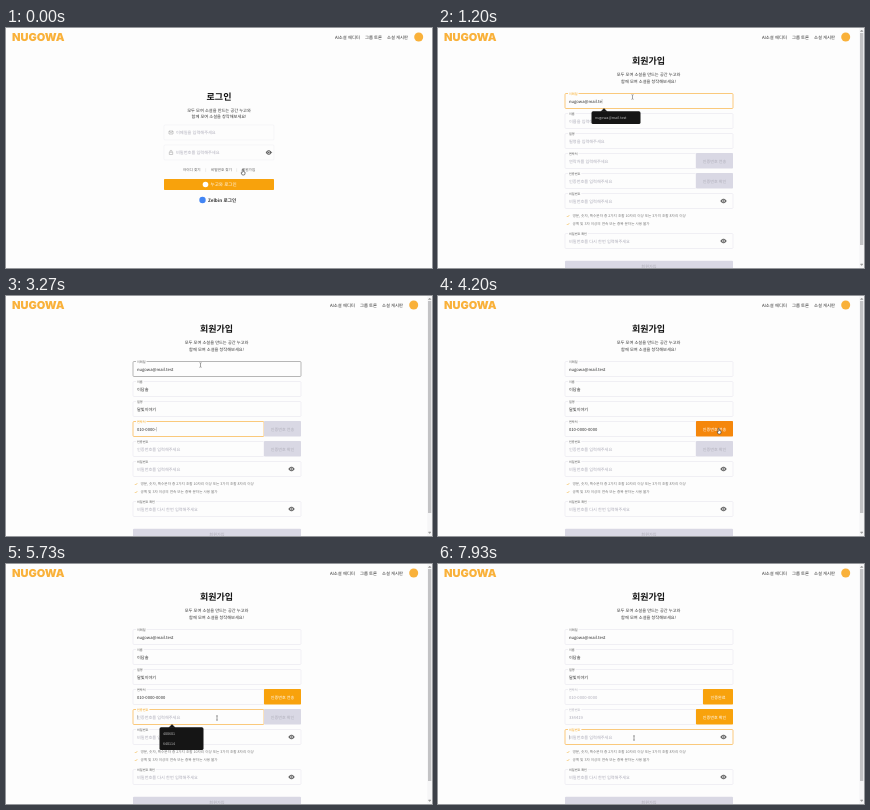
An HTML page with a canvas for the animation above (8000 ms loop, 426 by 240 pixels).

```html
<!DOCTYPE html>
<html lang="ko">
<head>
<meta charset="utf-8">
<style>
html, body { margin: 0; height: 100%; overflow: hidden; background: #fdfdfd; }
canvas { display: block; width: 100vw; height: 100vh; }
</style>
</head>
<body>
<canvas></canvas>
<script>
const W = 426, H = 240, LOOP = 8000;
const canvas = document.querySelector('canvas');
const ctx = canvas.getContext('2d');
const FONT = '"Noto Sans CJK KR", "Noto Sans CJK", "Noto Sans", sans-serif';
const ORANGE = '#f8a20c', HOVER = '#f5870c', INK = '#2b2b2b', PALE = '#ebeaf1', HINT = '#aeadba', MUTED = '#d9d8e4';
const BRAND = 'NUGOWA', BRAND_KO = '누고와', EMAIL = 'nugowa@mail.test';

function text(str, x, y, size = 4.17, color = INK, weight = 400, align = 'left', family = FONT) {
  ctx.font = `${weight} ${size}px ${family}`;
  ctx.fillStyle = color;
  ctx.textAlign = align;
  ctx.fillText(str, x, y + size * 0.37);
}

function rect(x, y, w, h, color, r = 0) {
  ctx.fillStyle = color;
  ctx.beginPath();
  ctx.roundRect(x, y, w, h, r);
  ctx.fill();
}

function outline(x, y, w, h, color, line = 0.7) {
  ctx.strokeStyle = color;
  ctx.lineWidth = line;
  ctx.beginPath();
  ctx.roundRect(x, y, w, h, 1);
  ctx.stroke();
}

function dot(x, y, r, color) {
  ctx.fillStyle = color;
  ctx.beginPath();
  ctx.arc(x, y, r, 0, 7);
  ctx.fill();
}

function path(d, x, y, color, fill) {
  ctx.save();
  ctx.translate(x, y);
  const shape = new Path2D(d);
  if (fill) { ctx.fillStyle = fill; ctx.fill(shape); }
  ctx.strokeStyle = color;
  ctx.lineWidth = 0.6;
  ctx.stroke(shape);
  ctx.restore();
}

function eye(x, y) {
  path('M-2.9 0Q0-3.8 2.9 0Q0 3.8-2.9 0Z', x, y, '#555', '#555');
  dot(x, y, 1.3, '#fff');
  dot(x, y, 0.8, '#555');
}

function header(shift) {
  text(BRAND, 6, 9, 11, '#f9b13a', 900, 'left', 'Inter, sans-serif');
  text('AI소설 에디터', 329 - shift, 9.3, 4.3, INK, 500);
  text('그룹 토론', 359 - shift, 9.3, 4.3, INK, 500);
  text('소설 게시판', 381 - shift, 9.3, 4.3, INK, 500);
  dot(412.7 - shift, 9, 4.5, '#f9b13a');
}

function intro(title, x, y) {
  text(title, x, y, 9, '#111', 700, 'center');
  text(`모두 모여 소설을 만드는 공간 ${BRAND_KO}`, x, y + 13.5, 4.2, '#333', 400, 'center');
  text('함께 모여 소설을 창작해보세요!', x, y + 20.2, 4.2, '#333', 400, 'center');
}

function loginPage() {
  header(0);
  intro('로그인', 213, 68.5);
  outline(158, 97, 110, 15, '#f3f2f5');
  outline(158, 117, 110, 15, '#f3f2f5');
  path('M-2-1.5H2V1.5H-2ZM-2-1.5L0 .3L2-1.5', 165, 104.5, '#aaa');
  path('M-1.7-.3H1.7V2H-1.7ZM-1-.3V-1.2A1 1 0 0 1 1-1.2V-.3', 165, 124.5, '#aaa');
  text('이메일을 입력해주세요', 170, 104.3, 4.2, HINT);
  text('비밀번호를 입력해주세요', 170, 124.3, 4.2, HINT);
  eye(262.8, 124.5);
  text('아이디 찾기', 177, 142, 3.6, '#555');
  text('|', 200, 142, 3.2, '#aaa', 400, 'center');
  text('비밀번호 찾기', 205, 142, 3.6, '#555');
  text('|', 231, 142, 3.2, '#aaa', 400, 'center');
  text('회원가입', 236, 142, 3.6, '#555');
  rect(158, 151, 110, 11, ORANGE, 0.7);
  dot(199.5, 156.5, 2.8, '#fff');
  text(`${BRAND_KO} 로그인`, 204.5, 156.5, 4.5, '#fff', 500);
  dot(196.5, 172, 3.2, '#4285f4');
  text('Zelbin 로그인', 202, 172, 4.6, '#333', 700);
}

// Fields with their typing span and the span during which they hold focus.
const fields = [
  { y: 65.5, label: '이메일', hint: '이메일을 입력해주세요', value: EMAIL, type: [560, 1290], focus: [530, 1400] },
  { y: 85.5, label: '이름', hint: '이름을 입력해주세요', value: '이담솔', type: [1450, 1750], focus: [1400, 1800] },
  { y: 105.5, label: '필명', hint: '필명을 입력해주세요', value: '달빛이야기', type: [1850, 2230], focus: [1800, 2300] },
  { y: 125.5, label: '연락처', hint: '연락처를 입력해주세요', value: '010-0000-0000', type: [2500, 3600], focus: [2300, 4100],
    button: '인증번호 전송' },
  { y: 145.5, label: '인증번호', hint: '인증번호를 입력해주세요', value: '334419', type: [5900, 6650], focus: [5450, 7350],
    button: '인증번호 확인' },
  { y: 165.5, label: '비밀번호', hint: '비밀번호를 입력해주세요', focus: [7800, LOOP], eye: true },
  { y: 205.5, label: '비밀번호 확인', hint: '비밀번호를 다시 한번 입력해주세요', focus: [LOOP, LOOP], eye: true },
];
const SIGNUP = 330, VERIFIED = 7350;

function typed({ value, type }, t) {
  if (!value) return '';
  const p = Math.min(1, Math.max(0, (t - type[0]) / (type[1] - type[0])));
  return value.slice(0, Math.floor(p * value.length));
}

const inside = (p, x, y, w, h) => p.x > x && p.x < x + w && p.y > y && p.y < y + h;

function drawField(f, t, pointer) {
  const value = typed(f, t);
  const focused = t >= f.focus[0] && t < f.focus[1];
  const verified = f.button && t >= VERIFIED;
  const done = verified && f.label === '연락처';
  const split = done ? 265 : 258;
  const width = f.button ? split - 127 : 168;
  const hovered = inside(pointer, 127, f.y, width, 15);
  const border = focused ? '#f9b446' : hovered && !verified ? '#999' : PALE;
  outline(127, f.y, width, 15, border);

  ctx.font = `400 3.1px ${FONT}`;
  rect(130, f.y - 1, ctx.measureText(f.label).width + 2, 2, '#fdfdfd');
  text(f.label, 131, f.y, 3.1, focused ? ORANGE : verified ? HINT : '#555');
  text(value || f.hint, 131, f.y + 7.7, 4.17, value && !verified ? INK : HINT);
  if (focused) {
    ctx.font = `400 4.17px ${FONT}`;
    rect(131 + ctx.measureText(value).width, f.y + 5.4, 0.3, 4.6, '#666');
  }
  if (f.eye) eye(285.5, f.y + 7.5);
  if (f.button) {
    const active = value.length === f.value.length;
    const over = inside(pointer, split, f.y, 295 - split, 15);
    rect(split, f.y - 0.5, 295 - split, 15.5, active ? over ? HOVER : ORANGE : MUTED, 0.7);
    text(done ? '인증완료' : f.button, (split + 295) / 2, f.y + 7.5, 4.1, active ? '#fff' : '#b0afba', active ? 500 : 400, 'center');
  }
}

function suggestions(y, w, h, items) {
  rect(153.5, y, w, h, '#151515', 1.6);
  path('M-3 0L0-3L3 0Z', 166, y + 0.3, '#151515', '#151515');
  items.forEach((item, i) => text(item, 157, y + 6.8 + i * 9.2, 3.6, '#bbb'));
}

function signupPage(t, pointer) {
  header(5);
  intro('회원가입', 210.5, 33);
  fields.forEach(f => drawField(f, t, pointer));
  const rules = ['영문, 숫자, 특수문자 중 2가지 조합 10자리 이상 또는 3가지 조합 8자리 이상',
    '공백 및 3자 이상의 연속 또는 중복 문자는 사용 불가'];
  rules.forEach((rule, i) => {
    const y = 188 + i * 8;
    path('M-1.2 0L-.3 1L1.4-1', 130, y, '#f4bd55');
    text(rule, 134.5, y, 3.6, '#777');
  });
  rect(127, 232.7, 168, 12, MUTED, 1);
  text('회원가입', 211, 238.3, 4.17, '#aaa9b2', 400, 'center');

  if (t >= 580 && t < 1300) suggestions(83.3, 49, 12.7, [EMAIL]);
  if (t >= 5500 && t < 5950) suggestions(163.3, 44, 22.7, ['488681', '648114']);

  rect(421.3, 0, 4.7, H, '#f6f6f7');
  rect(422, 5, 3.3, 212, '#c3c3c5');
  path('M-1.2 0H1.2L0-1.5Z', 423.7, 3.5, '#999', '#999');
  path('M-1.2 0H1.2L0 1.5Z', 423.7, 236, '#999', '#999');
}

// Pointer route: time, x, y; it rests between equal positions.
const route = [
  [0, 237, 144], [350, 237, 144], [520, 194.5, 69], [3650, 194.5, 69], [4000, 281, 135],
  [4700, 281, 135], [5300, 211, 154], [6850, 211, 154], [7150, 279, 154],
  [7400, 279, 154], [7760, 196, 174], [LOOP, 196, 174],
];

function pointerAt(t) {
  const i = route.findIndex(stop => stop[0] > t);
  const [t0, x0, y0] = route[i - 1], [t1, x1, y1] = route[i];
  const p = (t - t0) / (t1 - t0), e = p * p * (3 - 2 * p);
  return { x: x0 + (x1 - x0) * e, y: y0 + (y1 - y0) * e };
}

function drawPointer(p, t) {
  const onField = t >= SIGNUP && fields.some(f => inside(p, 127, f.y, f.button ? 131 : 168, 15));
  const onButton = t < SIGNUP || inside(p, 258, 125, 37, 36);
  if (onField) path('M-1-2.3Q0-2.3 0-1.7Q0-2.3 1-2.3M0-1.7V1.7M-1 2.3Q0 2.3 0 1.7Q0 2.3 1 2.3', p.x, p.y, '#666');
  else if (onButton) path('M-.8-2.5Q0-3 .3-2.3V-.5L2 0V2L1.3 3H-.7L-2 .8L-.8 .7Z', p.x, p.y, '#333', '#fff');
  else path('M0 0V5L1.2 4L2 5.8L2.8 5.4L2 3.7H3.5Z', p.x, p.y, '#fff', '#222');
}

function frame(now) {
  const t = now % LOOP;
  const dpr = devicePixelRatio || 1;
  const w = Math.round(innerWidth * dpr), h = Math.round(innerHeight * dpr);
  if (canvas.width !== w || canvas.height !== h) { canvas.width = w; canvas.height = h; }
  ctx.setTransform(w / W, 0, 0, h / H, 0, 0);
  ctx.textRendering = 'geometricPrecision';
  rect(0, 0, W, H, '#fdfdfd');
  const pointer = pointerAt(t);
  if (t < SIGNUP) loginPage();
  else signupPage(t, pointer);
  drawPointer(pointer, t);
}

const start = performance.now();
(function tick() {
  frame(Math.max(0, performance.now() - start));
  requestAnimationFrame(tick);
})();
</script>
</body>
</html>
```
